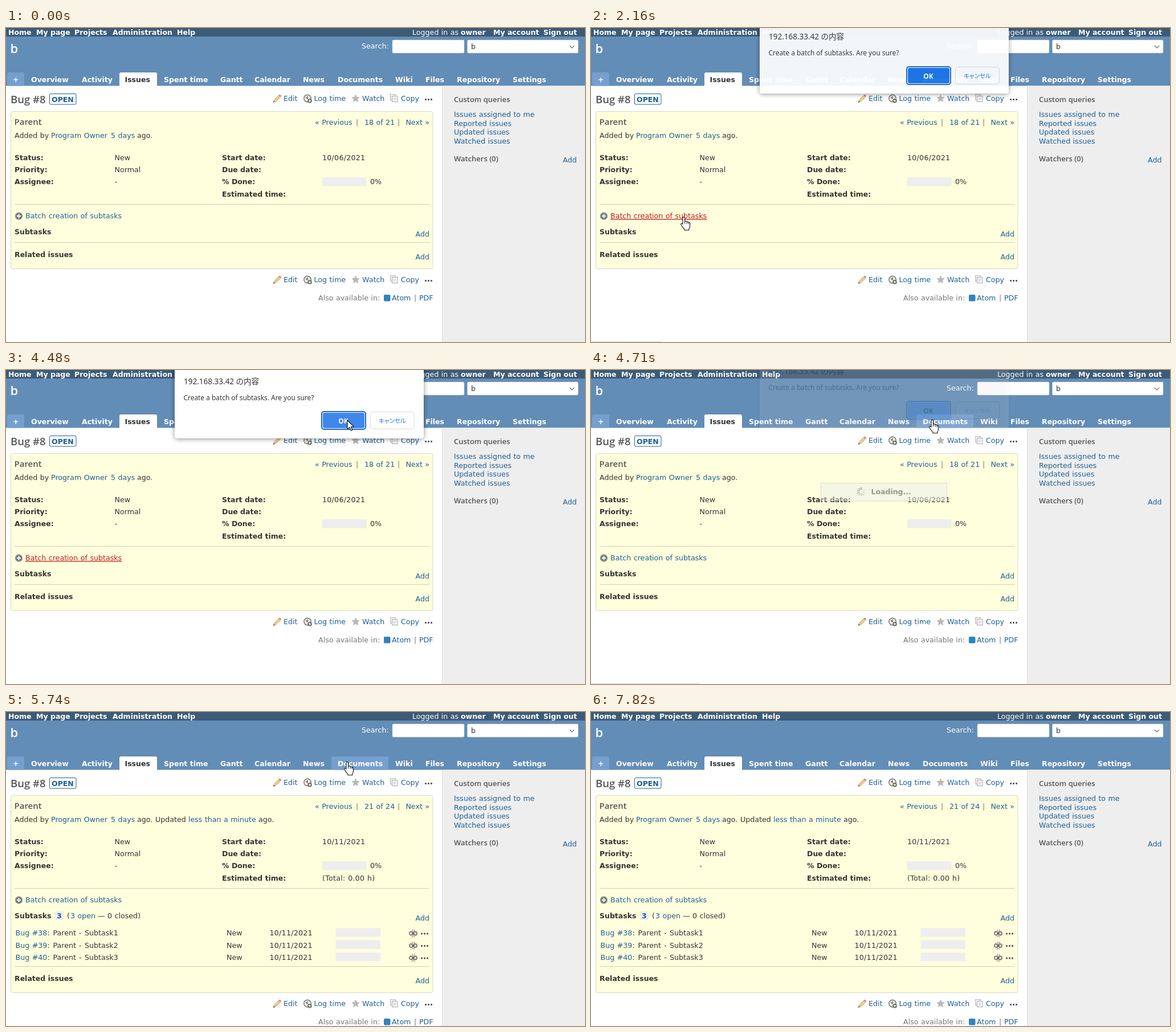
Recreate the animation shown at these times as an HTML page. Size 1016 px wide and 551 px high, loop 8.76 s.

```html
<!DOCTYPE html>
<html lang="en">
<head>
<meta charset="utf-8">
<title>Batch creation of subtasks</title>
<style>
html, body { margin: 0; width: 100%; height: 100%; overflow: hidden; background: #fff; }
svg { display: block; width: 1016px; height: 551px; }
text { font: 12.65px "DejaVu Sans", sans-serif; word-spacing: .4px; fill: #333; }
text.b { font-weight: 700; font-size: 12.5px; word-spacing: 0; }
text.h { font: 600 15px "Open Sans", sans-serif; word-spacing: 0; fill: #555; }
text.ui { font: 11.9px "Noto Sans", "Noto Sans CJK JP", sans-serif; word-spacing: 0; }
text.num { letter-spacing: .25px; }
text.w { fill: #fff; }
text.a { fill: #1f5f93; }
text.g { fill: #777; }
text.hot { fill: #c61a1a; text-decoration: underline; }
.closing text { fill: #14283c; }
.closing .panel { fill-opacity: .42; }
.closing .edge { stroke: #5f86ab; }
</style>
</head>
<body>
<svg id="stage" viewBox="0 0 1016 551"></svg>
<script>
const LOOP = 8760;
const stage = document.getElementById('stage');

const text = (x, y, s, cls = '', extra = '') => `<text x="${x}" y="${y}" class="${cls}" ${extra}>${s}</text>`;
const rect = (x, y, w, h, fill, extra = '') => `<rect x="${x}" y="${y}" width="${w}" height="${h}" fill="${fill}" ${extra}/>`;
const path = (d, fill, extra = '') => `<path d="${d}" fill="${fill}" ${extra}/>`;
const group = (id, body, extra = '') => `<g id="${id}" ${extra}>${body}</g>`;
const at = (x, y, body) => `<g transform="translate(${x} ${y})">${body}</g>`;
const rule = y => rect(15, y, 728, 1, '#cfcfba');
const add = y => text(743, y, 'Add', 'a', 'text-anchor="end"');
const dots = (x, y) => [0, 5, 10].map(d => rect(x + d, y, 3, 3, '#555', 'rx="1"')).join('');

const icons = {
  pencil: path('M0 14L1.5 10L10 1.5Q11.5 0 13 1.5T12.5 4.5L4 12.8Z', '#f0d28a', 'stroke="#b98a4a" stroke-width=".9"') +
    path('M9.5 2L11 .8Q13.5 .6 13.2 3.4L12 4.6Z', '#d98a80') + path('M0 14L1 11.4L2.7 13Z', '#555'),
  clock: '<circle cx="7" cy="7" r="6.2" fill="#eee" stroke="#777" stroke-width="1.5"/>' +
    path('M7 3V7.3L4 5', 'none', 'stroke="#555" stroke-width="1.2"') +
    '<circle cx="11" cy="11.2" r="3.8" fill="#6b6b4a"/>' + path('M11 9v4.4M8.8 11.2h4.4', 'none', 'stroke="#fff" stroke-width="1.2"'),
  star: path('M6.5 0L8.4 4.4L13 4.8L9.5 7.9L10.6 12.5L6.5 10L2.4 12.5L3.5 7.9L0 4.8L4.6 4.4Z', '#b9b9b9', 'stroke="#a3a3a3" stroke-width=".6"'),
  copy: rect(.5, .5, 9, 10, '#f4f4f4', 'stroke="#b5b5b5"') + rect(3.5, 3.5, 9.5, 10, '#fafafa', 'stroke="#a5a5a5"') +
    path('M5.5 6.5h5.5M5.5 8.5h5.5M5.5 10.5h4', 'none', 'stroke="#ccc"'),
  plus: '<circle cx="6.5" cy="6.5" r="6" fill="#6d767c" stroke="#9a9a90" stroke-width="1.4"/>' +
    path('M6.5 3v7M3 6.5h7', 'none', 'stroke="#e4f0f4" stroke-width="2.4"'),
  unlink: '<g fill="none" stroke="#777" stroke-width="1.8"><rect x="1" y="4" width="6" height="6" rx="3"/><rect x="8" y="4" width="6" height="6" rx="3"/></g>' +
    path('M5 7h5', 'none', 'stroke="#555" stroke-width="1.5"') +
    path('M6 0l1 3M10 0l-1 3M5.5 14l1.3-3M9.5 14l-1-3', 'none', 'stroke="#a05a5a"')
};

const toolbar = () => at(469, 116.5, icons.pencil) + text(487, 128, 'Edit', 'a') +
  at(522, 116.5, icons.clock) + text(540.5, 128, 'Log time', 'a') +
  at(607, 117, icons.star) + text(625, 128, 'Watch', 'a') +
  at(674, 116, icons.copy) + text(693, 128, 'Copy', 'a') + dots(735, 124);

function header() {
  const top = [[4, 'Home'], [53, 'My page'], [120, 'Projects'], [187, 'Administration'], [300, 'Help'],
    [798, 'owner'], [855, 'My account'], [943, 'Sign out']];
  const tabs = [[12, '+'], [44, 'Overview'], [133, 'Activity'], [277, 'Spent time'], [376, 'Gantt'], [436, 'Calendar'],
    [521, 'News'], [582, 'Documents'], [683, 'Wiki'], [736, 'Files'], [791, 'Repository'], [889, 'Settings']];
  const tab = 'rx="3"';
  return rect(0, 0, 1016, 16, '#3e5b76') + rect(0, 15, 1016, 86.5, '#628db6') +
    top.map(([x, s]) => text(x, 12, s, 'b w')).join('') + text(713, 12, 'Logged in as', 'w') +
    text(7.5, 44, 'b', 'h w', 'style="font-size:22px"') + text(624, 36, 'Search:', 'w') +
    rect(678, 21, 126, 23, '#fff', 'rx="2" stroke="#ccc" stroke-width=".6"') +
    rect(809.5, 21, 194.5, 23, '#fff', 'rx="2" stroke="#ccc" stroke-width=".6"') +
    text(816, 37, 'b') + path('M989 31l4 4l4-4', 'none', 'stroke="#777" stroke-width="1.4"') +
    rect(2, 78, 30, 23.5, '#759fcf', tab) + rect(199, 78, 66, 26, '#fff', tab) +
    rect(571, 78, 100, 23.5, '#759fcf', tab + ' id="tabHover"') +
    tabs.map(([x, s]) => text(x, 94.5, s, 'b w')).join('') + text(208.5, 94.5, 'Issues', 'b');
}

function sidebar() {
  const links = ['Issues assigned to me', 'Reported issues', 'Updated issues', 'Watched issues'];
  const small = 'style="font-size:13px"';
  return rect(765, 101.5, 251, 450, '#eee') + rect(765, 101.5, 1, 450, '#ddd') +
    text(786, 130, 'Custom queries', 'h', small) +
    links.map((s, i) => text(786, 156 + i * 15.6, s, 'a')).join('') +
    text(786, 234, 'Watchers (0)', 'h', small) + text(977, 236, 'Add', 'a');
}

function details() {
  const labels = [[15, 'Status:', 'Priority:', 'Assignee:'], [379, 'Start date:', 'Due date:', '% Done:', 'Estimated time:']];
  const lineY = i => 232 + i * 21.2;
  return text(14.5, 170, 'Parent', 'h') +
    text(542, 170, '« Previous', 'a') + text(614, 170, '|', 'g') + text(629, 170, '18 of 21', 'a', 'id="position"') +
    text(687, 170, '|', 'g') + text(743, 170, 'Next »', 'a', 'text-anchor="end"') +
    text(15, 193, 'Added by') + text(79, 193, 'Program Owner', 'a') + text(184, 193, '5 days', 'a') + text(230, 193, 'ago.') +
    group('updated', text(262, 193, 'Updated') + text(320, 193, 'less than a minute', 'a') + text(443, 193, 'ago.') +
      text(555, lineY(3), '(Total: 0.00 h)', 'num')) +
    labels.map(([x, ...names]) => names.map((s, i) => text(x, lineY(i), s, 'b')).join('')).join('') +
    ['New', 'Normal', '-'].map((s, i) => text(190.5, lineY(i), s)).join('') +
    text(555, 232, '', 'num', 'id="startDate"') + rect(554.5, 262, 78, 15.5, '#eee') + text(639, lineY(2), '0%') + rule(309);
}

function subtasks() {
  const row = i => {
    const y = 392 + i * 21.5;
    return text(16.5, y, `Bug #${38 + i}`, 'a', `id="bug${i}"`) + text(72.5, y, ':') + text(82.5, y, 'Parent') +
      text(128, y, '-') + text(138, y, `Subtask${i + 1}`) +
      text(387, y, 'New') + text(462.5, y, '10/11/2021', 'num') + rect(578.5, y - 13, 78.5, 15.5, '#eee') +
      at(707, y - 10.5, icons.unlink) + dots(728, y - 4.5);
  };
  return text(15, 361.5, 'Subtasks', 'b') + add(366) +
    group('children', rect(86, 350, 15, 15, '#e9edf1', 'rx="2"') + text(89, 361.5, '3', 'b a') +
      text(107, 361.5, '(') + text(113, 361.5, '3 open', 'a') + text(161, 361.5, '— 0 closed)') + [0, 1, 2].map(row).join(''));
}

const related = () => rule(376) + text(15, 402, 'Related issues', 'b') + add(406) + at(0, 318, toolbar()) +
  text(548, 478, 'Also available in:', 'g') + rect(663, 468, 11.5, 11.5, '#2f84bd', 'rx="2"') +
  text(677, 478, 'Atom', 'a') + text(716, 478, '|', 'g') + text(725, 478, 'PDF', 'a');

const dialog = () => rect(296, -30, 437, 150, '#fff', 'rx="4" class="panel"') +
  text(312, 25, '192.168.33.42 の内容', 'ui', 'style="font-size:13.5px"') +
  text(311.5, 52.5, 'Create a batch of subtasks. Are you sure?', 'ui') +
  rect(554, 73, 77, 31, 'none', 'rx="4" stroke="#1a66cc" stroke-width="2"') + rect(556, 75, 73, 27, '#1a73e8', 'rx="3" id="ok"') +
  text(592, 93.5, 'OK', 'ui w', 'text-anchor="middle" style="font-weight:600"') +
  rect(639.5, 73.5, 77, 30, 'none', 'rx="4" stroke="#dadce0" class="edge"') +
  text(678, 93, 'キャンセル', 'ui', `text-anchor="middle" style="font-size:10.5px;font-weight:500;fill:#1a73e8;font-feature-settings:'palt'"`);

function loading() {
  const spokes = Array.from({ length: 10 }, (_, i) =>
    `<path d="M0-3.5V-7.5" stroke="#333" stroke-width="1.8" opacity="${.1 + i * .09}" transform="rotate(${i * 36})"/>`).join('');
  return rect(403.5, 198.5, 221, 31.5, '#eee', 'stroke="#bbb"') + at(474, 213.5, group('spinner', spokes)) +
    text(491.5, 218, 'Loading...', 'b');
}

const outline = 'stroke="#111" stroke-width="1.1" stroke-linejoin="round"';
const cursor = () =>
  path('M0 0V16L3.8 12.6L6.3 18.4L8.8 17.3L6.3 11.7H11.3Z', '#fff', outline + ' id="arrow"') +
  group('hand', path('M-1.5 9V1a1.8 1.8 0 0 1 3.6 0v6q3-1 3.6 .8q2.6-.5 3 1q2.4-.2 2.4 2v4q0 3-1.8 5.5v2.2h-8v-2q-3.5-3.5-5.8-7.6q-.8-2 1-2.4q1.4 0 2 1.5z', '#fff', outline) +
    path('M2.1 7v4M5.7 8v3.5M8.7 9v3', 'none', 'stroke="#111"'), 'transform="translate(-1.5 -.7)"');

stage.innerHTML = rect(0, 0, 1016, 551, '#fff') + header() + sidebar() +
  text(8, 132, 'Bug #8', 'h', 'style="font-size:18.5px"') +
  rect(76.5, 115.5, 46.5, 18.5, '#fff', 'rx="2" stroke="#1f5f93"') + text(80, 129.5, 'OPEN', 'b a') + toolbar() +
  rect(8.5, 146.5, 740.5, 276, '#ffffdd', 'rx="3" stroke="#d7d7c8" id="issue"') + details() +
  group('batch', at(16, 323.5, icons.plus) + text(34, 334, 'Batch creation of subtasks', 'a', 'id="batchLink"')) +
  group('subtasks', subtasks()) + group('related', related()) +
  group('loading', loading(), 'opacity=".5"') + rect(0, 550, 125, 1, '#d8d8d8', 'id="status"') +
  group('dialog', dialog(), 'style="filter:drop-shadow(0 1px 4px rgba(0,0,0,.45))"') + group('cursor', cursor());

const el = Object.fromEntries([...stage.querySelectorAll('[id]')].map(e => [e.id, e]));
const show = (e, on) => e.setAttribute('display', on ? 'inline' : 'none');
const shift = (e, x, y) => e.setAttribute('transform', `translate(${x} ${y})`);
const smooth = u => u * u * (3 - 2 * u);
const linear = u => u;

const moves = [
  { from: 520, to: 1300, steps: 10, ease: smooth, points: [[757, 533], [161, 337]] },
  { from: 1550, to: 1700, steps: 2, ease: linear, points: [[162, 335], [164, 333]] },
  { from: 2550, to: 3320, steps: 10, ease: smooth, points: [[164, 333], [599, 88]] },
  { from: 4630, to: 4640, steps: 1, ease: linear, points: [[600, 89], [600, 89]] },
  { from: 6420, to: 7280, steps: 11, ease: linear, points: [[600, 89], [472, 202], [200, 362], [58, 443], [66, 357]] },
  { from: 7370, to: 7820, steps: 6, ease: linear, points: [[66, 357], [60, 390], [130, 470], [246, 545]] }
];

// Catmull-Rom curve through evenly timed points
function along(points, u) {
  const last = points.length - 1, i = Math.min(Math.floor(u * last), last - 1), f = u * last - i;
  const p = k => points[Math.max(0, Math.min(last, k))];
  return [0, 1].map(c => {
    const [a, b, d, e] = [p(i - 1)[c], p(i)[c], p(i + 1)[c], p(i + 2)[c]];
    return b + f * ((d - a) / 2 + f * (a - 2.5 * b + 2 * d - e / 2 + f * (1.5 * (b - d) + (e - a) / 2)));
  });
}

function pointer(t) {
  const m = moves.filter(m => t >= m.from).pop();
  if (!m || t >= 7820) return null;
  const u = Math.min(1, Math.floor((t - m.from) / (m.to - m.from) * m.steps + 1e-6) / m.steps);
  return along(m.points, m.ease(u));
}

function dialogPose(t) {
  if (t < 2080 || t >= 4790) return null;
  if (t < 2160) return [.4, -14];
  if (t < 2250) return [.93, -5];
  if (t < 4630) return [1, 0];
  return t < 4710 ? [.65, -9] : [.28, -18];
}

function statusWidth(t) {
  if (t >= 1860 && t < 3470) return 125;
  if (t >= 4630 && t < 5260) return 191;
  return t >= 5260 && t < 5740 ? 336 : 0;
}

function draw(t) {
  const reloaded = t >= 5260, complete = t >= 5340;
  const growth = complete ? 70 : reloaded ? 43 : 0;
  const pos = pointer(t);
  const linkHot = t >= 1550 && t < 4630;
  const tabHot = (t >= 4630 && t < 5260) || (t >= 5340 && t < 6498);

  show(el.updated, reloaded);
  show(el.children, reloaded);
  show(el.batch, !reloaded || complete);
  el.position.textContent = reloaded ? '21 of 24' : '18 of 21';
  el.startDate.textContent = reloaded ? '10/11/2021' : '10/06/2021';
  el.issue.setAttribute('height', 276 + growth);
  shift(el.subtasks, 0, reloaded && !complete ? -27 : 0);
  shift(el.related, 0, growth);
  show(el.tabHover, tabHot);
  el.batchLink.setAttribute('class', linkHot ? 'hot' : 'a');
  el.status.setAttribute('width', statusWidth(t));

  show(el.loading, t >= 4630 && t < 4940);
  el.spinner.setAttribute('transform', `rotate(${Math.floor(t / 77) * 36})`);

  const pose = dialogPose(t);
  show(el.dialog, pose);
  if (pose) {
    el.dialog.setAttribute('opacity', pose[0]);
    shift(el.dialog, 0, pose[1]);
    el.dialog.classList.toggle('closing', t >= 4710);
    el.ok.setAttribute('fill', t >= 4250 ? '#3f87e8' : t >= 3240 ? '#2a7be4' : '#1a73e8');
  }

  let bugHot = false;
  for (let i = 0; i < 3; i++) {
    const hot = complete && pos && pos[0] > 16 && pos[0] < 72 && Math.abs(pos[1] - 388 - i * 21.5) < 8;
    el['bug' + i].setAttribute('class', hot ? 'hot' : 'a');
    bugHot = bugHot || hot;
  }

  show(el.cursor, pos);
  if (pos) {
    const hand = (t >= 1550 && t < 2627) || (t >= 4630 && t < 6498) || bugHot;
    shift(el.cursor, ...pos);
    show(el.hand, hand);
    show(el.arrow, !hand);
  }
}

const start = performance.now();
function tick() {
  draw((performance.now() - start) % LOOP);
  requestAnimationFrame(tick);
}
tick();
</script>
</body>
</html>
```
